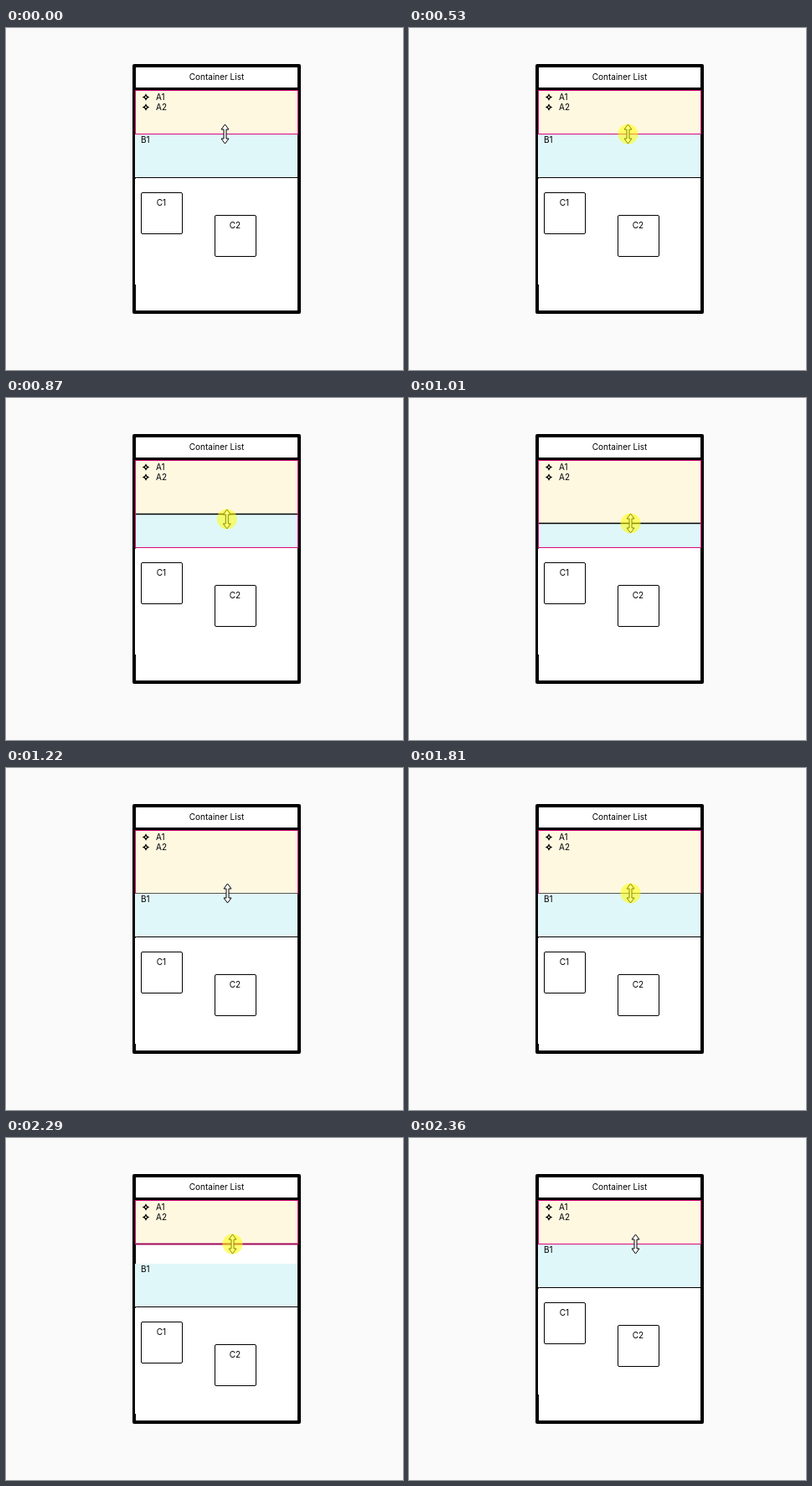
These frames come from a looping animation (474x408 px, 3220 ms). An HTML page:

```html
<!DOCTYPE html>
<html lang="en">
<head>
<meta charset="utf-8">
<title>Resizable container list</title>
<style>
  html, body { margin: 0; width: 100%; height: 100%; overflow: hidden; background: #fafafa; }
  svg { display: block; }
  text { font: 10px Inter, Roboto, sans-serif; fill: #000; }
  .mid { text-anchor: middle; }
  .line { fill: none; stroke: #000; }
  .pink { fill: none; stroke: #d6087a; }
  .cursor { fill: #fff; stroke: #000; stroke-linejoin: round; }
</style>
</head>
<body>
<svg width="474" height="408" viewBox="0 0 474 408">
  <defs>
    <path id="star" fill-rule="evenodd" d="M0-4.2 1.5-1.5 4.2 0 1.5 1.5 0 4.2-1.5 1.5-4.2 0-1.5-1.5ZM0-1.3 1.3 0 0 1.3-1.3 0Z"/>
  </defs>
  <rect x="151" y="43" width="201" height="298" rx="2"/>
  <path fill="#fff" d="M155 47H348V71H155ZM155 74H348V337H155Z"/>
  <text class="mid" x="251.5" y="62">Container List</text>

  <g id="lower">
    <path fill="#e0f7fa" d="M154 127H348V178H154Z"/>
    <text x="161" y="137">B1</text>
    <path fill="#fff" d="M154 179H348V306H154Z"/>
    <path class="line" d="M154 180Q154 178.5 155.5 178.5H348"/>
    <rect class="line" x="161.5" y="196.5" width="49" height="49" rx="1.5"/>
    <rect class="line" x="249.5" y="223.5" width="49" height="49" rx="1.5"/>
    <text class="mid" x="185.5" y="212">C1</text>
    <text class="mid" x="273.5" y="239">C2</text>
  </g>

  <rect id="panel" x="154" y="74" width="195" fill="#fff8e1"/>
  <use href="#star" x="167" y="82.5"/>
  <use href="#star" x="167" y="94.5"/>
  <text x="179" y="86">A1</text>
  <text x="179" y="98">A2</text>
  <rect id="frame" class="pink" x="154.5" y="74.5" width="194"/>
  <path id="edge" class="line" d="M155 0H348"/>

  <g id="pointer">
    <path id="arrow" class="cursor" d="M0-11.5 4.5-5.5H1.5V5.5H4.5L0 11.5-4.5 5.5H-1.5V-5.5H-4.5Z"/>
    <path id="hand" class="cursor" d="M-3 8C-4 5-7 3-7.5 0-7.5-2-5.5-1.5-4 1L-5.5-4C-6-6.5-4-7-3.3-5L-2-1-2.5-6.5C-2.3-8.5-.3-8.5 0-6.5L.4-1 1.5-6.5C2-8.3 4-7.8 3.8-6L3-.5 5-4C6.3-5.5 7.8-4.3 7-2.5 5.5 1 6 4 4 8Z"/>
    <circle id="glow" r="12" fill="#ff0" fill-opacity=".54"/>
  </g>
</svg>
<script>
const LOOP = 3220, STEP = 70, TRAVEL = 23;
const el = id => document.getElementById(id);
const set = (id, name, value) => el(id).setAttribute(name, value);
const show = (id, on) => set(id, 'visibility', on ? 'visible' : 'hidden');
const ease = x => { x = Math.min(1, Math.max(0, x)); return x * x * (3 - 2 * x); };

function draw(now) {
  const t = now % LOOP;
  const down = t >= 730 && t < 1220;
  const up = t >= 1950 && t < 2360;
  const moved = t >= 1220 && t < 2360;
  const back = t >= 1950;

  // The pointer leads; the panel edge trails behind it.
  const start = back ? 1940 : 730;
  const k = Math.floor((t - start) / STEP);
  const lead = t < start ? 0 : ease((k + 0.75) / 4);
  const trail = t < start ? 0 : ease((k + (back ? 0.5 : 0)) / 4);
  const shift = p => {
    const d = Math.round(TRAVEL * p);
    return t >= 1220 ? (back ? TRAVEL - d : TRAVEL) : d;
  };
  const edge = 126.5 + shift(trail);
  const x = back ? 264.5 + 6 * lead : 261.5 + 3 * lead;
  const y = 126 + shift(lead);

  set('lower', 'transform', `translate(0 ${moved ? TRAVEL : 0})`);
  set('panel', 'height', edge - 74);
  set('frame', 'height', (down ? 178.5 : edge) - 74.5);
  set('edge', 'transform', `translate(0 ${edge})`);
  set('edge', 'stroke', up ? '#a0085a' : moved ? '#555' : '#000');
  set('edge', 'stroke-width', up ? 2 : down ? 1.5 : 1);
  el('edge').style.stroke = up ? '#a0085a' : moved ? '#555' : '#000';
  show('edge', down || moved);

  const grab = up && edge - 0.5 - y > 1;
  set('pointer', 'transform', `translate(${x} ${y + 0.5})`);
  show('arrow', !grab);
  show('hand', grab);
  show('glow', t >= 530 && t < 1220 || t >= 1810 && t < 2360);
}

function tick() {
  draw(performance.now());
  requestAnimationFrame(tick);
}
tick();
</script>
</body>
</html>
```
